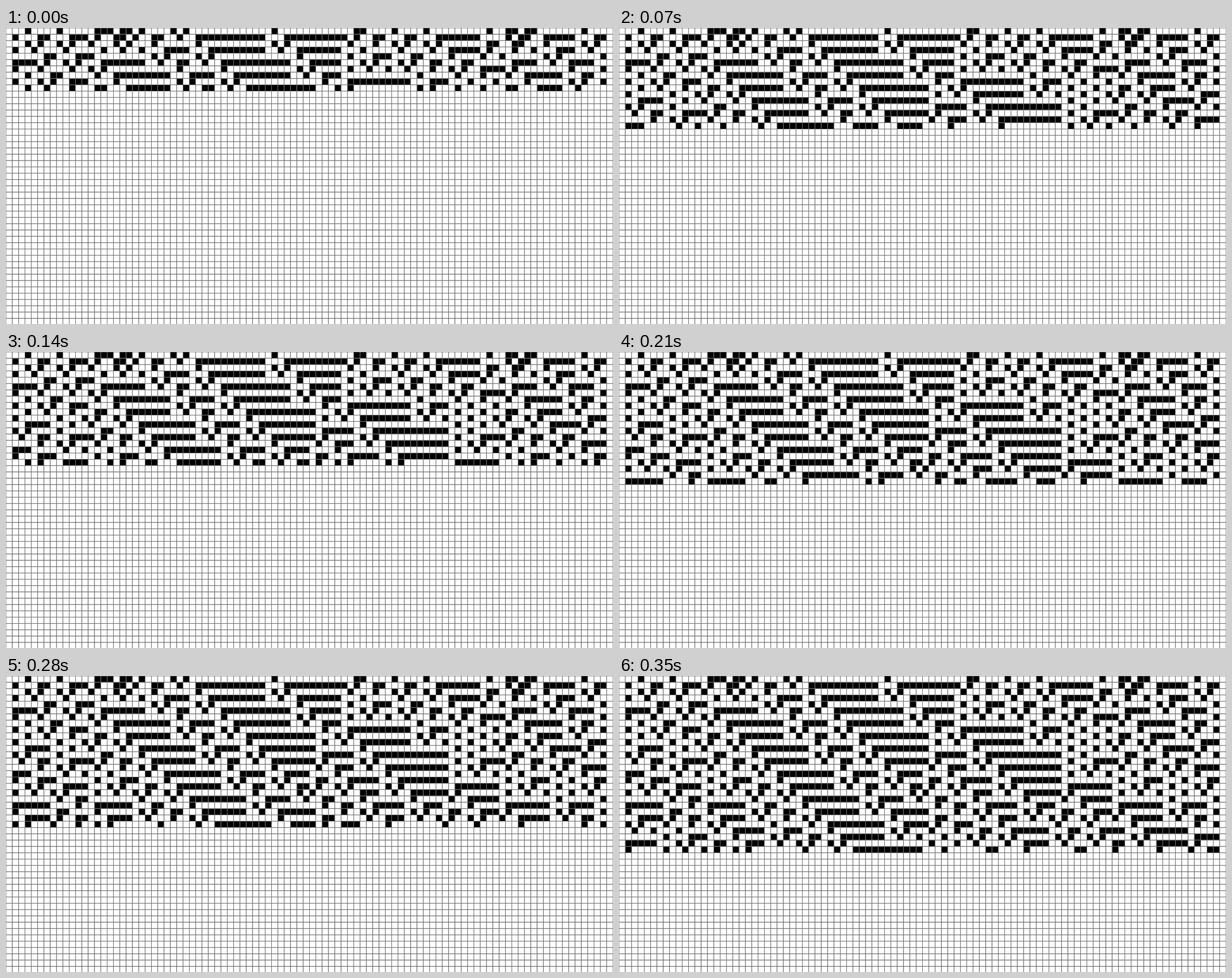
Write an HTML page with a canvas that moves like this. It is 1071 px wide and 523 px high and loops after 0.42 s.

```html
<!DOCTYPE html>
<html lang="en">
<head>
<meta charset="utf-8">
<title>Elementary cellular automaton, rule 41</title>
<style>
  html, body { margin: 0; width: 100%; height: 100%; overflow: hidden; background: #fff; }
  canvas { display: block; }
</style>
</head>
<body>
<canvas id="stage" width="1071" height="523"></canvas>
<script>
const canvas = document.getElementById('stage');
const ctx = canvas.getContext('2d');

const RULE = 41;
const COLS = 96;
const SIZE = canvas.width / COLS;
const ROWS = Math.ceil(canvas.height / SIZE);
const STEP_MS = 70;
const VISIBLE_ROWS = [10, 16, 18, 21, 24, 28];
const SEED = [3, 8, 14, 15, 16, 18, 19, 21, 26, 28, 42, 55, 56, 61, 66, 76, 79, 80, 82, 83, 91];

// The first and last cells always stay off.
function nextRow(row) {
  return row.map((cell, i) => {
    if (i === 0 || i === COLS - 1) return 0;
    const pattern = row[i - 1] << 2 | cell << 1 | row[i + 1];
    return RULE >> pattern & 1;
  });
}

const history = [Array.from({ length: COLS }, (_, i) => +SEED.includes(i))];
while (history.length < Math.max(...VISIBLE_ROWS)) history.push(nextRow(history.at(-1)));

function draw(visible) {
  ctx.fillStyle = '#fff';
  ctx.fillRect(0, 0, canvas.width, canvas.height);
  ctx.lineWidth = 1;
  ctx.strokeStyle = '#707070';
  for (let y = 0; y < ROWS; y++) {
    for (let x = 0; x < COLS; x++) {
      const box = [x * SIZE, y * SIZE, SIZE, SIZE];
      ctx.fillStyle = y < visible && history[y][x] ? '#000' : '#fff';
      ctx.fillRect(...box);
      ctx.strokeRect(...box);
    }
  }
}

const start = performance.now();
let shown = -1;

function tick() {
  const elapsed = Math.max(0, performance.now() - start);
  const step = Math.floor(elapsed / STEP_MS) % VISIBLE_ROWS.length;
  if (step !== shown) draw(VISIBLE_ROWS[shown = step]);
  requestAnimationFrame(tick);
}
tick();
</script>
</body>
</html>
```
